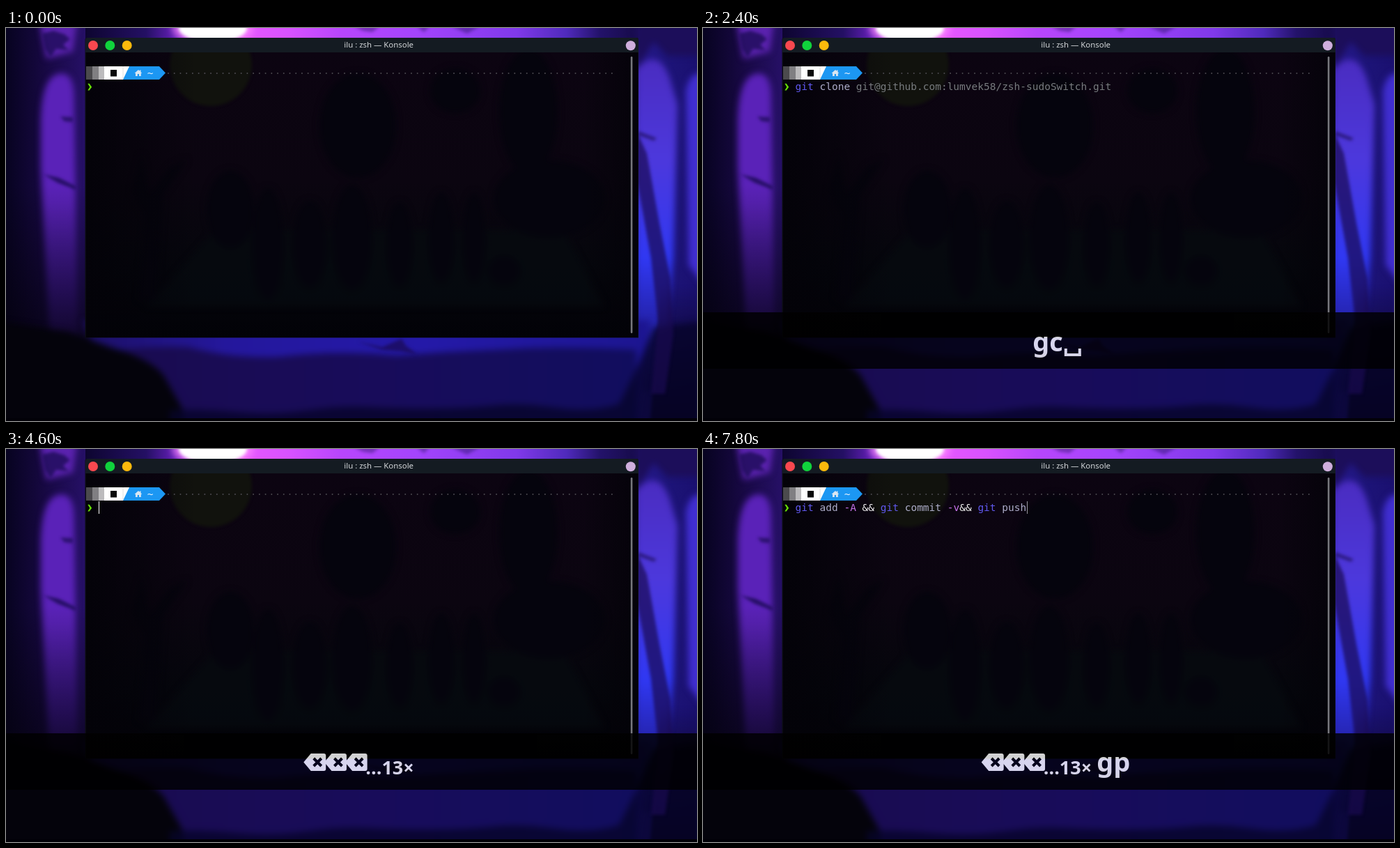
An HTML page that plays this animation: 992 by 564 pixels, repeating every 8000 ms.

```html
<!DOCTYPE html>
<html lang="en">
<head>
<meta charset="utf-8">
<title>Terminal alias expansion</title>
<style>
  html, body { margin: 0; width: 100%; height: 100%; overflow: hidden; background: #05030f; }
  svg { display: block; width: 992px; height: 564px; }
  filter { color-interpolation-filters: sRGB; }
  .mono { font: 14.49px "DejaVu Sans Mono", "Noto Sans Mono", monospace; white-space: pre; }
  .title { font: 11.4px "Noto Sans", "Open Sans", sans-serif; fill: #d3d6d9; text-anchor: end; }
  #keys { font-family: "Noto Sans", "Open Sans", sans-serif; font-weight: 700; fill: #fff; }
  .big { font-size: 38px; }
  .small { font-size: 27px; }
  .git { fill: #6058ee; }
  .bad { fill: #b8402f; }
  .arg { fill: #adadc9; }
  .flag { fill: #c673ea; }
  .op { fill: #f2f2f2; }
  .hint { fill: #777b7e; }
</style>
</head>
<body>
<svg viewBox="0 0 992 564" xmlns="http://www.w3.org/2000/svg">
  <defs>
    <linearGradient id="sky">
      <stop offset="0" stop-color="#0d0530"/>
      <stop offset=".11" stop-color="#241064"/>
      <stop offset=".18" stop-color="#7a24d4"/>
      <stop offset=".23" stop-color="#f05cff"/>
      <stop offset=".37" stop-color="#d852ff"/>
      <stop offset=".46" stop-color="#b846fc"/>
      <stop offset=".6" stop-color="#a444fc"/>
      <stop offset=".78" stop-color="#8039ea"/>
      <stop offset=".87" stop-color="#4f2abc"/>
      <stop offset=".93" stop-color="#23126a"/>
      <stop offset="1" stop-color="#160b48"/>
    </linearGradient>
    <linearGradient id="leftBase">
      <stop offset="0" stop-color="#070320"/>
      <stop offset=".4" stop-color="#160840"/>
      <stop offset="1" stop-color="#2a1270"/>
    </linearGradient>
    <linearGradient id="rightBase">
      <stop offset="0" stop-color="#2a1c98"/>
      <stop offset=".6" stop-color="#1d1478"/>
      <stop offset="1" stop-color="#1a1070"/>
    </linearGradient>
    <linearGradient id="dusk" x2="0" y2="1">
      <stop offset=".4" stop-color="#04020c" stop-opacity="0"/>
      <stop offset=".78" stop-color="#04020c" stop-opacity=".7"/>
      <stop offset="1" stop-color="#04020c" stop-opacity=".97"/>
    </linearGradient>
    <linearGradient id="leftGlow" x2="0" y2="1">
      <stop offset="0" stop-color="#5a22b8"/>
      <stop offset=".35" stop-color="#5a22b8"/>
      <stop offset=".6" stop-color="#401898"/>
      <stop offset=".8" stop-color="#2a1070"/>
      <stop offset="1" stop-color="#120638"/>
    </linearGradient>
    <linearGradient id="rightGlow" x2="0" y2="1">
      <stop offset="0" stop-color="#4a2cc0"/>
      <stop offset=".3" stop-color="#4c38dc"/>
      <stop offset=".6" stop-color="#3038f2"/>
      <stop offset=".78" stop-color="#2524b0"/>
      <stop offset="1" stop-color="#181068"/>
    </linearGradient>
    <linearGradient id="lake">
      <stop offset="0" stop-color="#1c0f64"/>
      <stop offset=".25" stop-color="#24179c"/>
      <stop offset=".6" stop-color="#2419a8"/>
      <stop offset="1" stop-color="#1c1590"/>
    </linearGradient>
    <linearGradient id="shore">
      <stop offset="0" stop-color="#190b50"/>
      <stop offset=".5" stop-color="#180c5a"/>
      <stop offset="1" stop-color="#110d5e"/>
    </linearGradient>
    <linearGradient id="pane" x2="0" y2="1">
      <stop offset="0" stop-color="#0c0411"/>
      <stop offset=".45" stop-color="#0b0510"/>
      <stop offset=".75" stop-color="#05060c"/>
      <stop offset="1" stop-color="#020207"/>
    </linearGradient>
    <linearGradient id="edge">
      <stop offset="0" stop-color="#030208" stop-opacity=".9"/>
      <stop offset=".2" stop-color="#030208" stop-opacity="0"/>
      <stop offset=".9" stop-color="#030208" stop-opacity="0"/>
      <stop offset="1" stop-color="#030208" stop-opacity=".8"/>
    </linearGradient>
    <filter id="soft" x="-20%" y="-20%" width="140%" height="140%"><feGaussianBlur stdDeviation="5"/></filter>
    <filter id="fine" x="-20%" y="-20%" width="140%" height="140%"><feGaussianBlur stdDeviation="2.2"/></filter>
    <clipPath id="view"><rect x="115" y="35" width="792" height="409"/></clipPath>
    <g id="erase">
      <path d="M0 12.5 10.5 0H29q3 0 3 3V22q0 3-3 3H10.5Z"/>
      <path d="M14.5 7 25.5 18M25.5 7 14.5 18" stroke="#000" stroke-width="4"/>
    </g>
  </defs>

  <!-- wallpaper -->
  <rect width="992" height="564" fill="#0a0422"/>
  <rect width="130" height="564" fill="url(#leftBase)"/>
  <rect x="890" width="102" height="564" fill="url(#rightBase)"/>
  <rect x="114" width="794" height="40" fill="url(#sky)"/>
  <g filter="url(#soft)">
    <path d="M50 130Q52 72 74 66 98 60 98 100L103 430 90 600H66L62 430 50 200Z" fill="url(#leftGlow)"/>
    <path d="M46-20H104L96 34 58 44Z" fill="#5a22ae"/>
    <path d="M904 60Q935 26 952 70L964 110 958 330 942 520H904Z" fill="url(#rightGlow)"/>
    <path d="M976 90Q984 54 1010 70V380L980 340Z" fill="#402ed0"/>
    <path d="M900-20H1010V40H950L930 20 905 60Z" fill="#1c0e5a"/>
  </g>
  <rect width="130" height="564" fill="url(#dusk)"/>
  <path d="M950 240H992V564H925Z" fill="url(#dusk)" filter="url(#fine)"/>
  <g filter="url(#soft)">
    <path d="M110 420H925L905 575H180Z" fill="url(#lake)"/>
    <path d="M150 464Q200 456 262 458 320 474 390 472 470 462 560 470 640 464 720 461 800 456 905 462V580H180Z" fill="url(#shore)"/>
    <path d="M-20 420 90 436 150 458Q206 474 226 498L254 548V590H-20Z" fill="#04030b"/>
    <path d="M235 548Q280 546 330 551T430 549 520 544 610 546 700 542 790 545 880 540L905 490 930 430 1010 420V590H235Z" fill="#07042a" opacity=".8"/>
  </g>
  <ellipse cx="297" cy="0" rx="58" ry="26" fill="#ff8cff" opacity=".7" filter="url(#soft)"/>
  <ellipse cx="297" cy="0" rx="49" ry="20" fill="#fff" filter="url(#fine)"/>
  <g filter="url(#fine)" fill="#1a0b52">
    <path d="M52 8 68 4 84 9 92 16 82 24 90 32 72 30 64 42 56 30Z" opacity=".75"/>
    <path d="M54 210 76 215 100 227V232L74 222Z" opacity=".8"/>
    <path d="M78 127 96 128 96 135 84 134Z" opacity=".7"/>
    <path d="M906 150 920 180 938 280 954 360 958 440 946 525H926L936 420 926 330 906 220Z" opacity=".7"/>
    <path d="M908 148 934 158 930 162 908 154Z" opacity=".6"/>
    <path d="M500-2H536L526 6 512 4ZM590-2H608L600 6ZM640-2H680L662 8Z" opacity=".4"/>
    <path d="M505 450 540 458 568 446 574 456 590 468 566 464 540 462Z" opacity=".7"/>
  </g>
  <rect y="560" width="992" height="4" fill="#020107"/>

  <!-- window -->
  <path d="M113.500 444.500V17q0-3 3-3H905q3 0 3 3V444.500Z" fill="#0b0c12"/>
  <path d="M114 35V17q0-3 3-3H905q3 0 3 3V35Z" fill="#141b22"/>
  <circle cx="125" cy="25" r="7" fill="#f9484f"/>
  <circle cx="149.300" cy="25" r="7" fill="#10d33c"/>
  <circle cx="173.700" cy="25" r="7" fill="#fdba0c"/>
  <circle cx="896.800" cy="25.300" r="7" fill="#cfaedd"/>
  <text class="title" x="585" y="28">ilu : zsh — Konsole</text>
  <g clip-path="url(#view)">
    <rect x="115" y="35" width="792" height="409" fill="url(#pane)"/>
    <circle cx="294" cy="53" r="59" fill="#11120d" filter="url(#fine)"/>
    <g filter="url(#soft)">
      <path d="M200 400 300 290H800L860 400Z" fill="#070a0f" opacity=".8"/>
      <g fill="#05040d">
        <ellipse cx="505" cy="140" rx="55" ry="75"/>
        <ellipse cx="750" cy="120" rx="42" ry="90"/>
        <ellipse cx="645" cy="90" rx="36" ry="32"/>
        <ellipse cx="780" cy="245" rx="80" ry="55"/>
        <ellipse cx="322" cy="260" rx="34" ry="55"/>
        <ellipse cx="376" cy="310" rx="22" ry="80"/>
        <ellipse cx="436" cy="310" rx="24" ry="62"/>
        <ellipse cx="497" cy="300" rx="28" ry="75"/>
        <ellipse cx="565" cy="310" rx="18" ry="60"/>
        <ellipse cx="625" cy="300" rx="18" ry="64"/>
        <ellipse cx="672" cy="300" rx="16" ry="64"/>
        <ellipse cx="715" cy="348" rx="22" ry="20"/>
        <path d="M195 180 205 240 235 200 260 188 225 240 215 390H190L200 270 180 235Z"/>
      </g>
    </g>
    <rect x="115" y="35" width="792" height="409" fill="url(#edge)"/>
  </g>
  <rect x="896.800" y="41" width="2.600" height="397" rx="1.300" fill="#77777d"/>

  <!-- prompt -->
  <g>
    <rect x="115" y="55" width="9" height="19" fill="#4b4a4d"/>
    <rect x="124" y="55" width="9" height="19" fill="#807f82"/>
    <rect x="133" y="55" width="8" height="19" fill="#bcbbbd"/>
    <path d="M141 55H178L170 74H141Z" fill="#fff"/>
    <path d="M177 55H220L229 64.500 220 74H168Z" fill="#1c97f3"/>
    <path d="M168 55V73" stroke="#d8d8d8" stroke-width=".8"/>
    <rect x="150" y="60" width="9" height="9.500" fill="#0a0a0a"/>
    <path d="M184.500 65 190 60 192 61.800V60.500H193.500V63.200L195.300 65H193.800V69H191V66H188.800V69H186V65Z" fill="#d9e6f2"/>
    <text class="mono" x="202.800" y="69.500" fill="#e8f2fb">~</text>
    <path d="M233 65H872" stroke="#4c4a50" stroke-width="2" stroke-linecap="round" stroke-dasharray="0 8.724"/>
    <path d="M117.300 79.800H119.700L123.200 84.700 119.700 89.600H117.300L120.300 84.700Z" fill="#66dd05"/>
  </g>
  <text id="line" class="mono" x="132.600" y="89"></text>
  <rect id="cursor" y="75" width="1" height="18"/>

  <!-- key display -->
  <g id="keys">
    <rect y="408" width="992" height="81" fill="#000"/>
    <g id="row"></g>
  </g>
</svg>
<script>
const LOOP = 8000, CELL = 8.724, LEFT = 132.6, MID = 509;
const REPO = 'git@github.com:lumvek58/zsh-sudoSwitch.git';
const CLONE = 'git clone ', PUSH = 'git add -A && git commit -v&& git push ';
const $ = id => document.getElementById(id);

// Each step changes only the fields it names.
const steps = [
  { t: 0, typed: '', hint: '', cursor: 0, n: 0, word: '', space: 0, under: 0, show: 0 },
  { t: 500, cursor: 1 },
  { t: 1000, cursor: 0 },
  { t: 1400, typed: 'g', hint: 'p', cursor: 1, word: 'g', under: 1, show: .22 },
  { t: 1500, show: .82 },
  { t: 1600, under: 0 },
  { t: 1700, typed: 'gc', hint: '', word: 'gc', under: 1 },
  { t: 1900, typed: CLONE, hint: REPO, space: 1 },
  { t: 2100, under: 0 },
  { t: 2400, cursor: 0 }
];

// Held backspace: two presses per 100 ms, the first three eat the shown keys.
for (let i = 0; i < 8; i++) {
  const len = Math.max(0, 9 - 2 * i);
  steps.push({
    t: 3700 + 100 * i, typed: CLONE.slice(0, len), cursor: 1,
    hint: len > 1 ? CLONE.slice(len) + REPO : len ? 'p' : '',
    n: Math.max(0, 2 * i - 1), word: i ? '' : 'g', space: 0, under: i ? 1 : 0
  });
}

steps.push(
  { t: 4600, under: 0 },
  { t: 4800, typed: 'g', hint: 'p', word: 'g', under: 1 },
  { t: 5000, under: 0 },
  { t: 5200, cursor: 0 },
  { t: 5700, typed: 'gp', hint: '', cursor: 1, word: 'gp', under: 1 },
  { t: 5900, under: 0 },
  { t: 6200, typed: PUSH, space: 1, under: 1 },
  { t: 6400, under: 0 },
  { t: 6700, cursor: 0 },
  { t: 7200, cursor: 1 },
  { t: 7600, cursor: 0 },
  { t: 7800, typed: PUSH.trimEnd(), cursor: 1, space: 0 }
);
for (let i = 1; i < steps.length; i++) steps[i] = { ...steps[i - 1], ...steps[i] };

function add(parent, tag, attrs, text) {
  const el = document.createElementNS('http://www.w3.org/2000/svg', tag);
  for (const k in attrs) el.setAttribute(k, attrs[k]);
  if (text) el.textContent = text;
  return parent.appendChild(el);
}

function tokenClass(word) {
  if (word === 'git' || word === 'gp' || word === 'gc') return 'git';
  if (/^g(i)?$/.test(word)) return 'bad';
  if (word[0] === '-') return 'flag';
  return word === '&&' ? 'op' : 'arg';
}

function drawLine({ typed, hint, cursor }) {
  const line = $('line'), bar = $('cursor');
  line.replaceChildren();
  for (const part of typed.match(/\s+|&&|[^\s&]+/g) || [])
    add(line, 'tspan', { class: tokenClass(part) }, part);
  if (hint) add(line, 'tspan', { class: 'hint' }, hint);
  bar.setAttribute('x', Math.ceil(LEFT + CELL * typed.length));
  bar.setAttribute('fill', hint || typed.endsWith('push') ? '#9a9aa2' : '#fff');
  bar.setAttribute('opacity', cursor);
}

function drawKeys({ n, word, space, under, show }) {
  const row = $('row'), base = n ? 462.5 : 464;
  let x = 0, last = null;
  row.replaceChildren();
  const put = (cls, y, text) => {
    const w = add(row, 'text', { class: cls, x, y }, text).getComputedTextLength();
    last = [x, w, y + 3];
    x += w;
  };
  for (let i = 0; i < Math.min(n, 3); i++, x += 29.7) {
    add(row, 'use', { href: '#erase', x, y: 437 });
    last = [x, 30, 465];
  }
  if (n > 3) put('small', 467, '...' + n + '×');
  if (n && word) x += 7;
  for (const c of word) put('big', base, c);
  if (space) {
    add(row, 'path', { d: `M${x + 2} ${base - 4}h4v7h16v-7h4v11h-24z` });
    last = [x, 28, base + 2];
    x += 28;
  }
  if (under && last) add(row, 'rect', { x: last[0], y: last[2], width: last[1], height: 2 });
  row.setAttribute('transform', `translate(${MID - (n ? 2.5 : 0) - x / 2} 0)`);
  $('keys').setAttribute('opacity', show);
}

const start = performance.now();
let shown = null;
function frame() {
  const t = (performance.now() - start) % LOOP;
  const step = steps.findLast(s => s.t <= t);
  if (step !== shown) {
    drawLine(step);
    drawKeys(step);
    shown = step;
  }
  requestAnimationFrame(frame);
}
frame();
</script>
</body>
</html>
```
